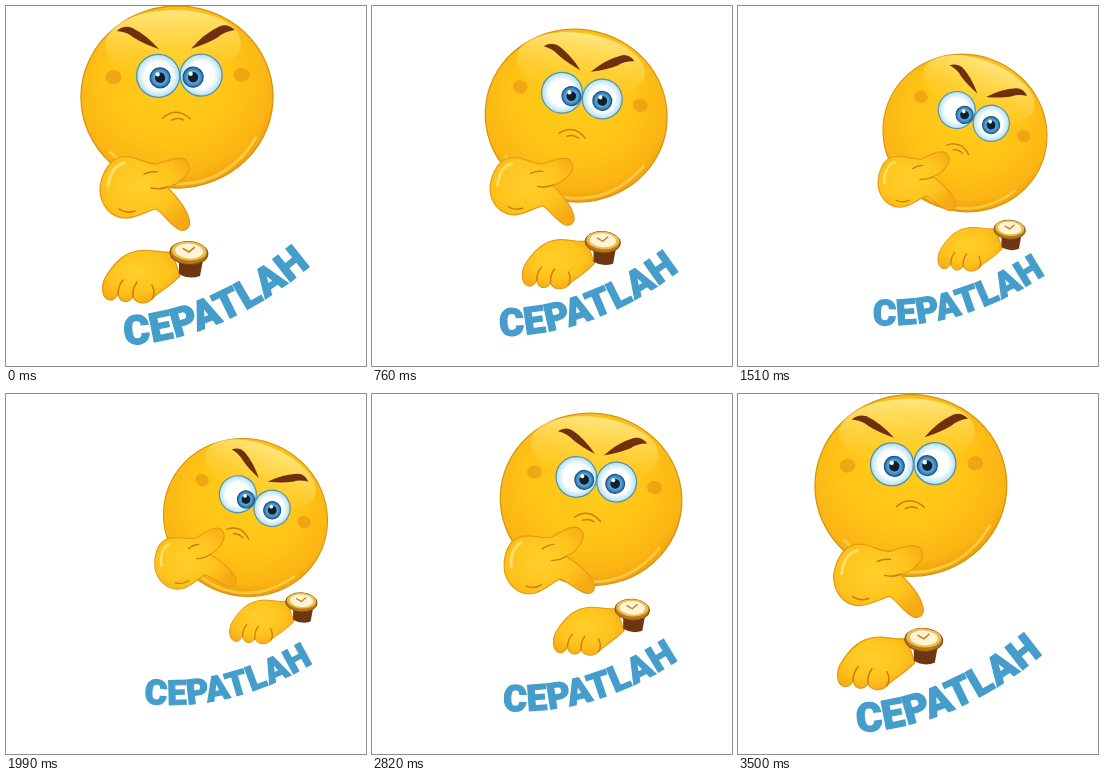
These frames come from a looping animation (360x360 px, 3.57 s). An HTML page:

```html
<!DOCTYPE html>
<html lang="id">
<head>
<meta charset="utf-8">
<title>Cepatlah</title>
<style>
  html, body { margin: 0; width: 100%; height: 100%; overflow: hidden; background: #fff; }
  svg { display: block; width: 100vw; height: 100vh; }
  text { font: 900 40px Roboto, Inter, sans-serif; letter-spacing: 1px; fill: #459dcb; stroke: #459dcb; stroke-width: 1.4; }
  .line { fill: none; stroke: #c97c0b; stroke-width: 1.5; stroke-linecap: round; }
  .skin { stroke: #e39a13; stroke-width: 1.2; stroke-linejoin: round; }
</style>
</head>
<body>
<svg viewBox="0 0 360 360">
  <defs>
    <radialGradient id="face" cx=".47" cy=".4" r=".62">
      <stop offset="0" stop-color="#ffcd1c"/>
      <stop offset=".55" stop-color="#ffc316"/>
      <stop offset=".85" stop-color="#fbb414"/>
      <stop offset="1" stop-color="#ec9a0c"/>
    </radialGradient>
    <linearGradient id="shine" x2="0" y2="1">
      <stop offset="0" stop-color="#fff2a0" stop-opacity=".75"/>
      <stop offset="1" stop-color="#ffd94a" stop-opacity="0"/>
    </linearGradient>
    <radialGradient id="glove" cx=".45" cy=".4" r=".65">
      <stop offset="0" stop-color="#ffd02a"/>
      <stop offset=".6" stop-color="#ffc31d"/>
      <stop offset="1" stop-color="#f6a914"/>
    </radialGradient>
    <radialGradient id="white" r=".52">
      <stop offset=".6" stop-color="#fff"/>
      <stop offset="1" stop-color="#a9dcee"/>
    </radialGradient>
    <radialGradient id="iris">
      <stop offset=".35" stop-color="#7cc6ee"/>
      <stop offset="1" stop-color="#236fae"/>
    </radialGradient>
    <g id="pupil">
      <circle r="10" fill="url(#iris)" stroke="#1c5485" stroke-width="1.2"/>
      <circle r="5.2" fill="#10202e"/>
      <circle cx="-2.5" cy="-3.5" r="2.2" fill="#fff"/>
    </g>
    <path id="arc" d="M119 339 Q222 333 313 252 L330 237"/>
  </defs>

  <g id="head">
    <ellipse cx="171" cy="91" rx="96" ry="91" fill="url(#face)" stroke="#d6940f" stroke-width="1.3"/>
    <ellipse cx="168" cy="38" rx="68" ry="34" fill="url(#shine)"/>
    <path d="M103 144 Q133 178 174 178 Q222 177 250 132" fill="none" stroke="#ffdf62" stroke-width="3" opacity=".6"/>
    <g fill="#dd850c" opacity=".45">
      <ellipse cx="108" cy="70" rx="8" ry="7"/>
      <ellipse cx="236" cy="70" rx="8" ry="7"/>
    </g>
    <g fill="url(#white)" stroke="#4d92ad" stroke-width="1.3">
      <circle cx="152.5" cy="69.5" r="21.5"/>
      <circle cx="195.5" cy="69.5" r="21"/>
    </g>
    <use href="#pupil" id="leftPupil"/>
    <use href="#pupil" id="rightPupil"/>
    <g fill="#70300f">
      <path id="leftBrow" d="M126 24 Q133 18 141 21 Q155 28 168 43 Q152 37 143 31 Q136 25 126 24Z"/>
      <path id="rightBrow" d="M223 25 Q216 18 208 21 Q192 28 179 43 Q196 38 206 32 Q213 26 223 25Z"/>
    </g>
    <path class="line" d="M156 112 Q170 100 184 113 M165 114 Q171 111 177 114" stroke-width="2"/>
  </g>

  <g id="point">
    <path class="skin" fill="url(#glove)" d="M182 157 C178 149 165 153 151 158 C139 159 129 148 115 151 C101 154 94 173 94 185 C95 200 105 211 118 212 C129 213 140 205 150 203 C157 207 165 220 174 224 C182 226 185 219 183 213 C180 201 170 190 161 181 C172 179 188 167 182 157Z"/>
    <path class="line" d="M145 182 Q154 184 161 181 M138 168 Q145 165 151 166 M113 203 Q120 208 129 205"/>
    <path d="M102 180 Q105 160 118 157" fill="none" stroke="#ffeb8c" stroke-width="3" stroke-linecap="round" opacity=".7"/>
  </g>

  <g id="wrist">
    <path class="skin" fill="url(#glove)" d="M166 246 C150 247 140 241 124 247 C112 252 105 262 99 272 C95 280 96 290 101 293 C106 296 110 292 112 288 C114 297 122 298 127 291 C130 298 140 299 146 293 C152 286 160 284 174 270Z"/>
    <path class="line" d="M112 288 Q112 280 117 274 M127 291 Q126 283 131 276 M146 293 Q150 287 146 279"/>
    <path d="M173 254 L197 254 L194 270 Q183 274 173 268Z" fill="#6d3610"/>
    <g transform="rotate(4 183 246)">
      <ellipse cx="183" cy="247" rx="19" ry="11.5" fill="#b87818" stroke="#7b4710"/>
      <ellipse cx="183" cy="245" rx="17.5" ry="9.5" fill="#eebd4b"/>
      <ellipse cx="183" cy="245" rx="14" ry="7.5" fill="#fff4d8"/>
      <path class="line" d="M177 243 L183 246 L188 241"/>
    </g>
  </g>

  <g id="word"><text><textPath href="#arc">CEPATLAH</textPath></text></g>
</svg>
<script>
const LOOP = 3570, STEPS = 52;
const keySteps = [0, 7, 15, 22, 36, 45, 51];

// One row per key step: x, y, scale, rotation. The last key repeats the first.
const tracks = {
  head: [[171, 91, 1, -1], [187, 98, .975, 1], [220, 121, .917, 17], [227, 127, .86, 21], [240, 114, .9, 18], [198.5, 98.5, .98, 0]],
  point: [[139.5, 187.5, 1, 0], [152, 187, .97, 0], [168.5, 183.5, .89, -3], [178, 178.5, .83, -8], [188, 166.5, .9, -17], [162, 179, .98, -7]],
  wrist: [[149, 266, 1, 0], [172.5, 260.5, .97, 0], [225, 247, .89, 0], [243.5, 239.5, .83, 0], [267.5, 218, .87, 0], [193, 248, .95, 0]],
  word: [[213, 286.5, 1, 0], [216.5, 285, .97, 1.7], [222, 285.5, .92, 5], [223.5, 282.5, .89, 7], [225, 277, .86, 10.5], [217.5, 283, .945, 4]]
};
const gazeTrack = [[-3, 14], [4.5, 2], [5, 0], [5.5, 0], [5.5, 0], [1.5, 1]]; // pupil shift, brow spread

const byId = id => document.getElementById(id);
const move = (id, x, y) => byId(id).setAttribute("transform", `translate(${x} ${y})`);

// Smooth cyclic curve through the keys.
function sample(rows, step) {
  const n = keySteps.length;
  const time = i => keySteps[(i + n) % n] + STEPS * Math.floor(i / n);
  const row = i => rows[(i + n) % n % rows.length];
  let i = n - 1;
  while (keySteps[i] > step) i--;
  const span = time(i + 1) - time(i), u = (step - time(i)) / span;
  return rows[0].map((_, c) => {
    const rate = k => (row(k + 1)[c] - row(k)[c]) / (time(k + 1) - time(k));
    const slope = k => {
      const before = time(k) - time(k - 1), after = time(k + 1) - time(k);
      return (rate(k - 1) * after + rate(k) * before) / (before + after);
    };
    const a = row(i)[c], b = row(i + 1)[c], v = 1 - u;
    return a * v * v * (1 + 2 * u) + b * u * u * (3 - 2 * u)
      + span * u * v * (slope(i) * v - slope(i + 1) * u);
  });
}

function draw(step) {
  for (const [id, rows] of Object.entries(tracks)) {
    const [x, y, scale, turn] = sample(rows, step), [ox, oy] = rows[0];
    byId(id).setAttribute("transform",
      `translate(${x} ${y}) rotate(${turn}) scale(${scale}) translate(${-ox} ${-oy})`);
  }
  const [gaze, spread] = sample(gazeTrack, step);
  move("leftPupil", 157.5 + gaze, 71.5);
  move("rightPupil", 190.5 + gaze, 71.5);
  move("leftBrow", -spread, 0);
  move("rightBrow", spread / 2, 0);
}

function tick() {
  draw(Math.floor(performance.now() % LOOP / LOOP * STEPS));
  requestAnimationFrame(tick);
}
tick();
</script>
</body>
</html>
```
